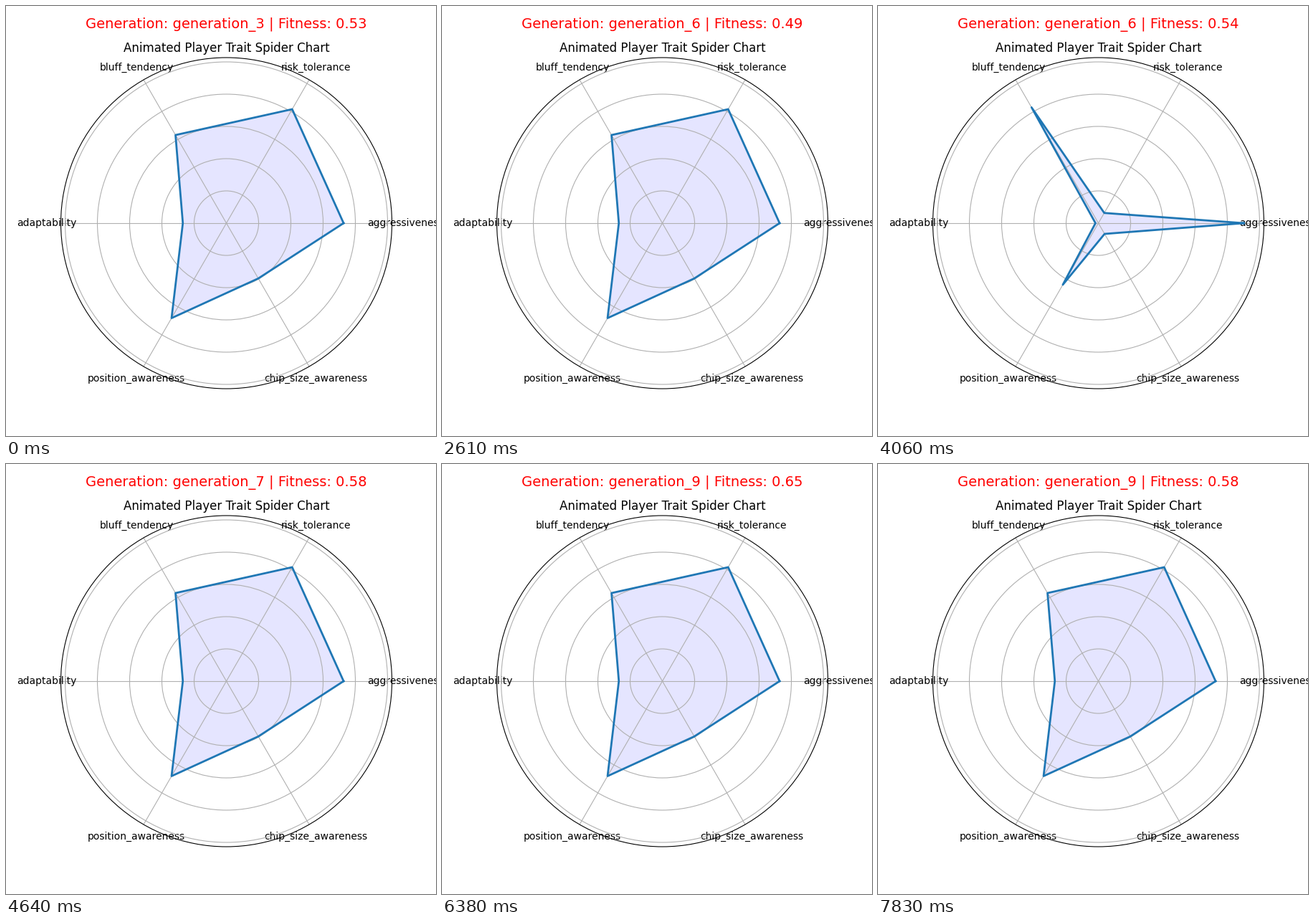
These frames come from a looping animation (600x600 px, 8000 ms). A matplotlib script:

```python
import numpy as np
import matplotlib.pyplot as plt
from matplotlib.animation import FuncAnimation

plt.rcParams["font.family"] = "DejaVu Sans"

LOOP_MS, TICK_MS, STEP_MS = 8000, 40, 290

TRAITS = ["aggressiveness", "risk_tolerance", "bluff_tendency",
          "adaptability", "position_awareness", "chip_size_awareness"]

# Trait values in the order of TRAITS
BALANCED = [0.727, 0.816, 0.631, 0.270, 0.680, 0.396]
BLUFFER = [0.902, 0.073, 0.829, 0.018, 0.441, 0.077]
CAREFUL = [0.360, 0.450, 0.400, 0.550, 0.985, 0.500]

# (first step, player, generation, fitness)
TIMELINE = [
    (0, BALANCED, 3, 0.53), (1, BALANCED, 4, 0.48), (5, BALANCED, 5, 0.37),
    (6, BALANCED, 5, 0.52), (7, BALANCED, 6, 0.45), (8, BALANCED, 7, 0.61),
    (9, BALANCED, 6, 0.49), (10, BLUFFER, 7, 0.58), (12, BLUFFER, 8, 0.62),
    (13, BLUFFER, 7, 0.51), (14, BLUFFER, 6, 0.54), (16, BALANCED, 7, 0.58),
    (17, BLUFFER, 7, 0.58), (18, BALANCED, 8, 0.61), (22, BALANCED, 9, 0.65),
    (23, CAREFUL, 8, 0.44), (24, BALANCED, 9, 0.62), (25, BALANCED, 9, 0.60),
    (27, BALANCED, 9, 0.58),
]

angles = np.linspace(0, 2 * np.pi, len(TRAITS), endpoint=False)
loop_angles = np.append(angles, angles[0])

fig, ax = plt.subplots(figsize=(6, 6), dpi=100, subplot_kw={"polar": True})
ax.set_ylim(0, 1.0267)
ax.set_yticks(np.arange(1, 6) / 5)
ax.set_yticklabels([])
ax.set_xticks(angles)
ax.set_xticklabels(TRAITS)
ax.set_title("Animated Player Trait Spider Chart", y=1.0)

closed = np.append(BALANCED, BALANCED[0])
line, = ax.plot(loop_angles, closed, linewidth=2)
area, = ax.fill(loop_angles, closed, color="blue", alpha=0.1)
ax.set_ylim(0, 1.0267)
caption = ax.text(0.5, 1.1, "", transform=ax.transAxes, ha="center",
                  va="center", fontsize=14, color="red")


def entry_at(step):
    return [e for e in TIMELINE if e[0] <= step][-1]


def update(frame):
    step = (frame * TICK_MS + TICK_MS - 10) // STEP_MS
    _, player, generation, fitness = entry_at(step)
    values = np.append(player, player[0])
    line.set_data(loop_angles, values)
    area.set_xy(np.column_stack([loop_angles, values]))
    caption.set_text(
        f"Generation: generation_{generation} | Fitness: {fitness:.2f}")
    return line, area, caption


anim = FuncAnimation(fig, update, frames=LOOP_MS // TICK_MS,
                     interval=TICK_MS, repeat=True, repeat_delay=0)
plt.show()
```
